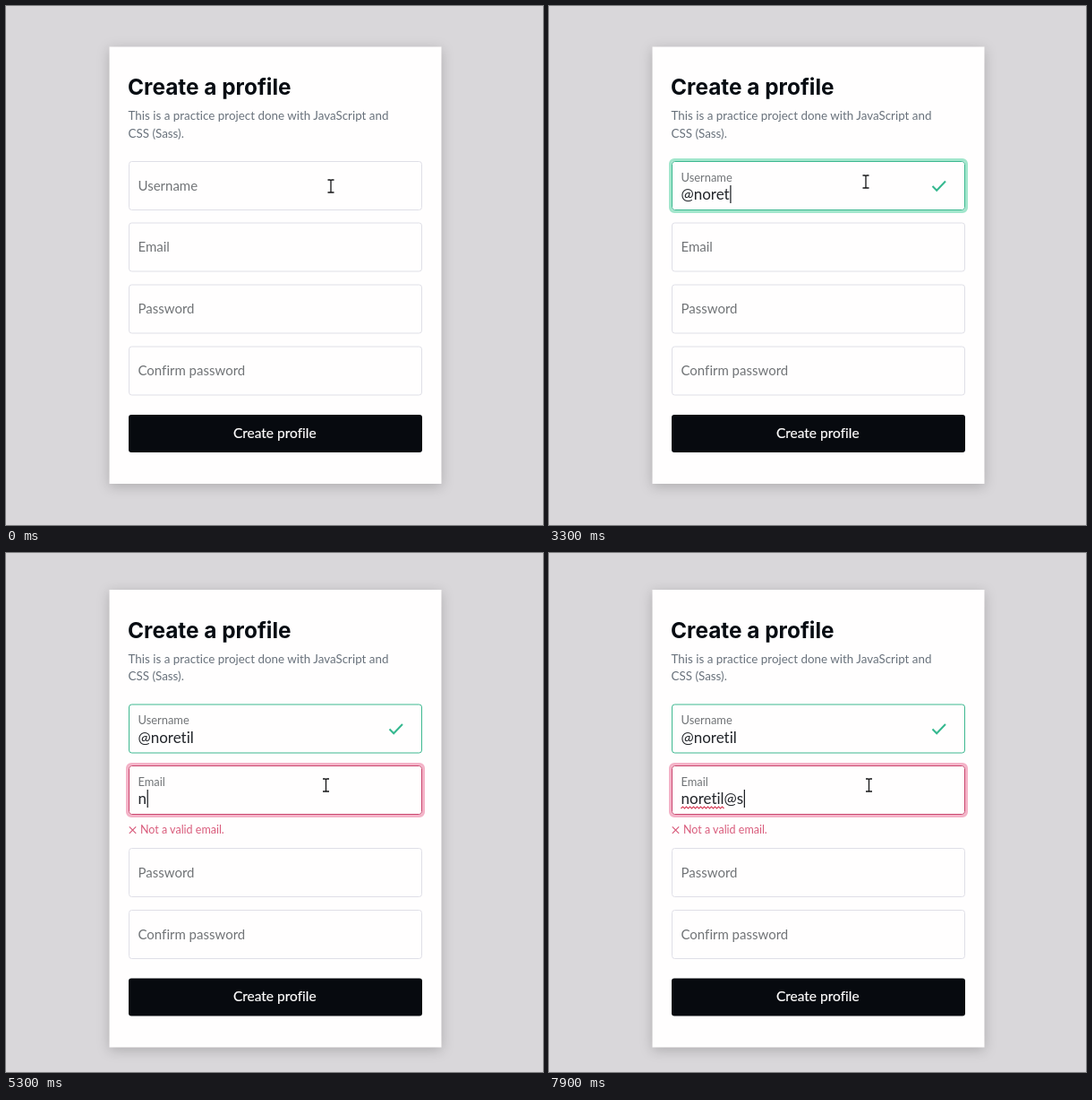
Recreate the animation shown at these times as an HTML page. Size 600 by 579 pixels, loop 8000 ms.

```html
<!DOCTYPE html>
<html lang="en">
<head>
<meta charset="utf-8">
<title>Create a profile</title>
<style>
  html, body { margin: 0; width: 100%; height: 100%; overflow: hidden; background: #d9d7da; }
  svg { display: block; width: 600px; height: 579px; font-family: Lato, "Open Sans", sans-serif; font-variant-ligatures: none; }
  .card { fill: #fffefe; filter: drop-shadow(0 3px 7px rgba(0, 0, 0, .2)); }
  .title { font: 700 24.4px Inter, Lato, sans-serif; fill: #070c12; }
  .sub { font-size: 13.4px; fill: #68717b; }
  .label { fill: #717477; }
  .value { font-size: 17px; fill: #22252a; }
  .action { font-size: 15.5px; fill: #fffefe; stroke: #fffefe; stroke-width: .2px; text-anchor: middle; }
  .error { font-size: 12.5px; fill: #d95c7c; }
  .line { fill: none; }
</style>
</head>
<body>
<svg id="stage" viewBox="0 0 600 579"></svg>
<script>
const LOOP = 8000, LABEL_TIME = 200, BLINK = 500;
const FIELD_X = 137.5, FIELD_W = 327, FIELD_H = 54, TEXT_X = 147.5;
const ERROR_UP = -4.5, ERROR_DOWN = 18.5;

const stage = document.getElementById('stage');

function add(parent, tag, attrs, text) {
  const el = document.createElementNS('http://www.w3.org/2000/svg', tag);
  set(el, attrs);
  if (text) el.textContent = text;
  parent.append(el);
  return el;
}
function set(el, attrs) {
  for (const key in attrs) el.setAttribute(key, attrs[key]);
}
const show = (el, on) => el.style.display = on ? '' : 'none';
const shift = (el, y) => el.setAttribute('transform', `translate(0 ${y})`);

// [time, text] pairs: the value after each key press
const fields = [
  { name: 'Username', y: 173.5, focus: 995, blur: 4660, tint: ['#3db890', '#a2e6cc'],
    keys: [[1300, '@'], [1600, '@n'], [1850, '@nt'], [2700, '@n'], [2850, '@no'], [3000, '@nor'],
           [3100, '@nore'], [3200, '@noret'], [3400, '@noreti'], [3550, '@noretil']] },
  { name: 'Email', y: 242, focus: 4660, blur: LOOP, tint: ['#c9476f', '#f4b2c7'],
    keys: [[5150, 'n'], [5500, 'no'], [5700, 'nor'], [5850, 'nore'], [6200, 'noret'],
           [6400, 'noreti'], [6550, 'noretil'], [7150, 'noretil@'], [7500, 'noretil@s']] },
  { name: 'Password', y: 311, keys: [] },
  { name: 'Confirm password', y: 380, keys: [] }
];
const errorFrom = fields[1].keys[0][0];
const squiggleFrom = 7150, squiggleLetters = 7;

const pointerPath = [[0, 363, 201], [100, 363, 201], [200, 354, 196],
                     [3900, 354, 196], [4400, 357.5, 259], [LOOP, 357.5, 259]];

const card = add(stage, 'rect', { class: 'card', x: 115.5, width: 371 });
const head = add(stage, 'g', {});
add(head, 'text', { class: 'title', x: 136, y: 99.3 }, 'Create a profile');
add(head, 'text', { class: 'sub', x: 136.5, y: 127.3 }, 'This is a practice project done with JavaScript and');
add(head, 'text', { class: 'sub', x: 136.5, y: 146.6 }, 'CSS (Sass).');

for (const f of fields) {
  f.group = add(stage, 'g', {});
  f.ring = add(f.group, 'rect', { class: 'line', x: FIELD_X - 2, y: -2, rx: 4.5,
    width: FIELD_W + 4, height: FIELD_H + 4, 'stroke-width': 3 });
  f.border = add(f.group, 'rect', { class: 'line', x: FIELD_X, y: 0, rx: 3, width: FIELD_W, height: FIELD_H });
  f.label = add(f.group, 'text', { class: 'label', x: TEXT_X }, f.name);
  f.value = add(f.group, 'text', { class: 'value', x: TEXT_X, y: 42.8 });
  f.caret = add(f.group, 'rect', { y: 26.5, width: 1.2, height: 20, fill: '#15181c' });
}
const [user, email] = fields;
const check = add(user.group, 'path', { class: 'line', d: 'M428.5 27.5l4.7 4.8 9.8-10.3', stroke: '#35b88f', 'stroke-width': 2 });
const squiggle = add(email.group, 'path', { class: 'line', stroke: '#d8405a', 'stroke-width': 1.2 });
const error = add(email.group, 'g', {});
add(error, 'path', { class: 'line', d: 'M137.8 67.9l7.4 7.4m0-7.4l-7.4 7.4', stroke: '#d95c7c', 'stroke-width': 1.2 });
add(error, 'text', { class: 'error', x: 150, y: 75.7 }, 'Not a valid email.');

const button = add(stage, 'g', {});
add(button, 'rect', { x: 137, y: 456, width: 328, height: 42, rx: 3, fill: '#070a0f' });
add(button, 'text', { class: 'action', x: 300.3, y: 481.5 }, 'Create profile');

const pointer = add(stage, 'path', { class: 'line', stroke: '#141416', 'stroke-width': 1.3,
  d: 'M-3.5-7h2.5q1 0 1 1q0-1 1-1h2.5M0-6v12M-3.5 7h2.5q1 0 1-1q0 1 1 1h2.5' });

function drawField(f, t) {
  const focused = t >= f.focus && t < f.blur;
  const past = f.keys.filter(k => k[0] <= t);
  const last = past[past.length - 1];
  const text = last ? last[1] : '';
  const p = Math.min(1, Math.max(0, (t - f.focus) / LABEL_TIME)) || 0;
  const lift = 1 - (1 - p) ** 2;

  f.label.style.fontSize = 15 - 2.1 * lift + 'px';
  f.label.setAttribute('y', 32.4 - 10.2 * lift);
  f.value.textContent = text;

  const [edge, glow] = text ? f.tint : focused ? ['#8b8b90', '#cbcace'] : ['#dfdfe7', 'none'];
  f.border.setAttribute('stroke', edge);
  f.ring.setAttribute('stroke', glow);
  show(f.ring, focused);

  const since = t - (last ? last[0] : f.focus);
  show(f.caret, focused && Math.floor(since / BLINK) % 2 === 0);
  f.caret.setAttribute('x', TEXT_X + .6 + (text ? f.value.getComputedTextLength() : 0));
  return text;
}

function drawSquiggle(on) {
  show(squiggle, on);
  if (!on) return;
  const end = TEXT_X + email.value.getSubStringLength(0, squiggleLetters);
  let d = `M${TEXT_X} 47.5`;
  for (let x = TEXT_X, i = 0; x < end - 2; x += 2, i++) d += `l2 ${i % 2 ? 2 : -2}`;
  squiggle.setAttribute('d', d);
}

function drawPointer(t) {
  const i = pointerPath.findIndex(k => k[0] > t);
  const [t0, x0, y0] = pointerPath[i - 1], [t1, x1, y1] = pointerPath[i];
  const p = (t - t0) / (t1 - t0), e = p * p * (3 - 2 * p);
  pointer.setAttribute('transform', `translate(${x0 + (x1 - x0) * e} ${y0 + (y1 - y0) * e})`);
}

function draw(t) {
  const invalid = t >= errorFrom;
  const up = invalid ? ERROR_UP : 0, down = invalid ? ERROR_DOWN : 0;
  set(card, { y: 45.5 + up, height: 487.5 + down - up });
  shift(head, up);
  fields.forEach((f, i) => shift(f.group, f.y + (i < 2 ? up : down)));
  shift(button, down);

  const [name] = fields.map(f => drawField(f, t));
  show(check, name !== '');
  show(error, invalid);
  drawSquiggle(t >= squiggleFrom);
  drawPointer(t);
}

const start = performance.now();
function tick() {
  draw((performance.now() - start) % LOOP);
  requestAnimationFrame(tick);
}
tick();
</script>
</body>
</html>
```
